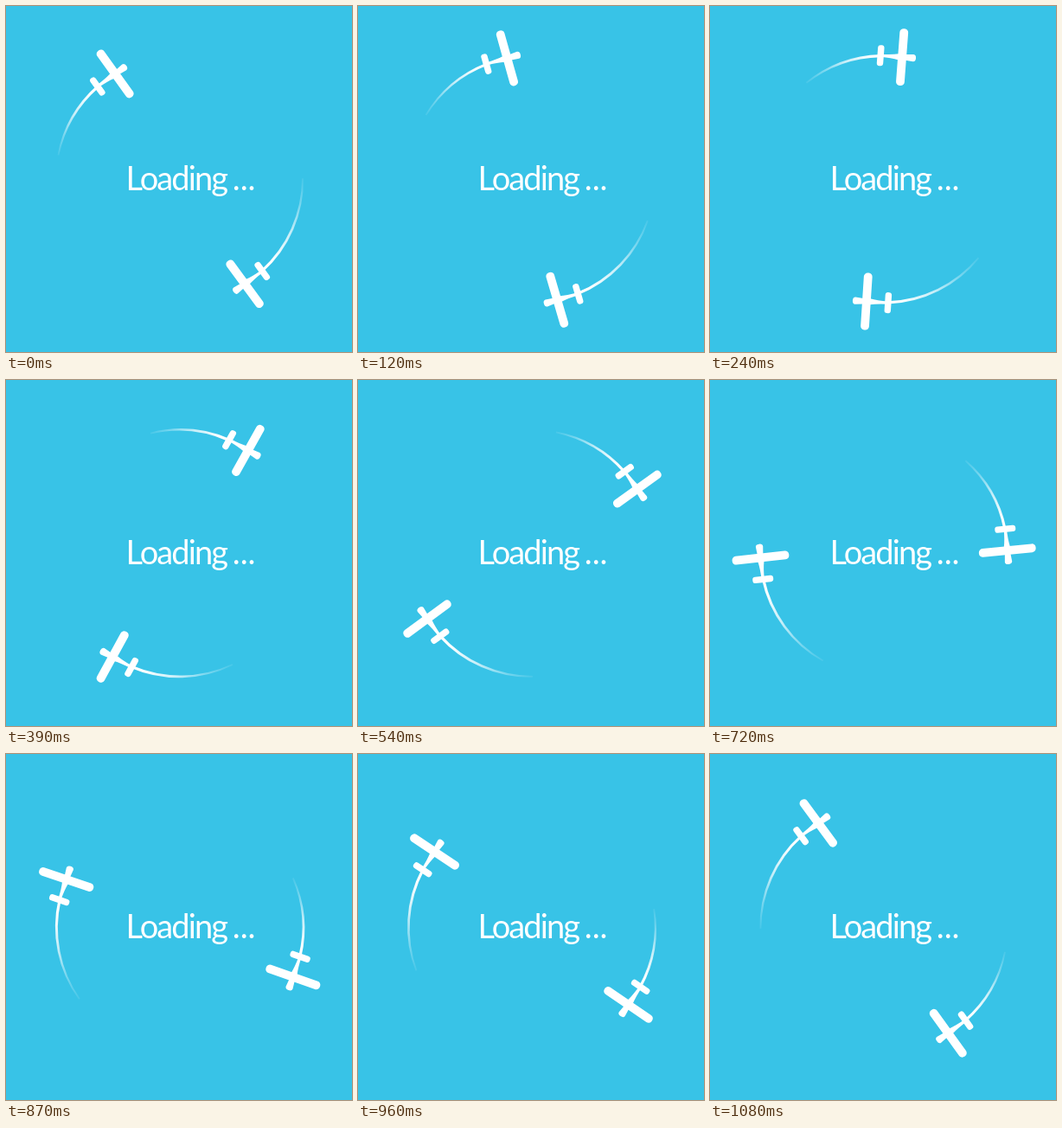
Recreate the animation shown at these times as an HTML page. Size 400 px wide and 400 px high, loop 1110 ms.

```html
<!DOCTYPE html>
<html lang="en">
<head>
<meta charset="utf-8">
<title>Loading</title>
<style>
  html, body { margin: 0; width: 100%; height: 100%; overflow: hidden; background: #38c3e7; }
  svg { display: block; width: 100vw; height: 100vh; }
  text { font: 38px Lato, "Open Sans", sans-serif; fill: #fff; }
  .word { letter-spacing: -1.9px; }
</style>
</head>
<body>
<svg viewBox="0 0 400 400">
  <defs>
    <g id="plane" fill="#fff">
      <rect x="-4.9" y="-33" width="9.8" height="66" rx="4.4"/>
      <rect x="-28.7" y="-12" width="7.4" height="24" rx="3.2"/>
      <path d="M-25-1.6Q-12-1.8-4-3.6L4-3.3L13-4.2Q16-4 16 0Q16 4 13 4.2L4 3.3L-4 3.6Q-12 1.8-25 1.6Z"/>
    </g>
  </defs>
  <g id="orbit"></g>
  <text class="word" x="138.5" y="213.2">Loading</text>
  <text x="261.7" y="213.2">...</text>
</svg>
<script>
const STEP_MS = 30, STEPS = 37, STEP_DEG = 5;
const CENTER = { x: 200.7, y: 200.6 };
const TAIL_LAG = 10, TILT = -4.3;
const TRAIL_THIN = 0.9, TRAIL_THICK = 1.6;

// Angles are clockwise degrees from straight up.
const flyers = [
  { angle: -31.4, radius: 143.1, trail: 47.2 },
  { angle: 148, radius: 142.3, trail: 58.5 }
];
const fade = [[0, 0.08], [0.25, 0.32], [0.55, 0.72], [0.9, 1]];

function polar(deg, radius) {
  const a = deg * Math.PI / 180;
  return [radius * Math.sin(a), -radius * Math.cos(a)].map(v => v.toFixed(2));
}

// A crescent strip that widens from its far end towards the plane.
function trailPath(from, to, radius) {
  const arc = (sweep, end) => `A${radius} ${radius} 0 0 ${sweep} ${end}`;
  return `M${polar(from, radius + TRAIL_THIN)}${arc(1, polar(to, radius + TRAIL_THICK))}` +
    `L${polar(to, radius - TRAIL_THICK)}${arc(0, polar(from, radius - TRAIL_THIN))}Z`;
}

function flyerMarkup({ angle, radius, trail }, i) {
  const from = angle - trail, to = angle - TAIL_LAG;
  const [x1, y1] = polar(from, radius);
  const [x2, y2] = polar(to, radius);
  const stops = fade.map(([at, alpha]) =>
    `<stop offset="${at}" stop-color="#fff" stop-opacity="${alpha}"/>`).join("");
  return `
    <linearGradient id="fade${i}" gradientUnits="userSpaceOnUse"
      x1="${x1}" y1="${y1}" x2="${x2}" y2="${y2}">${stops}</linearGradient>
    <path d="${trailPath(from, to, radius)}" fill="url(#fade${i})"/>
    <use href="#plane" transform="rotate(${angle}) translate(0 ${-radius}) rotate(${TILT})"/>`;
}

const orbit = document.getElementById("orbit");
orbit.innerHTML = flyers.map(flyerMarkup).join("");

function draw(ms) {
  const step = Math.floor(ms / STEP_MS) % STEPS;
  orbit.setAttribute("transform",
    `translate(${CENTER.x} ${CENTER.y}) rotate(${step * STEP_DEG})`);
}

let start;
function tick(now) {
  start ??= now;
  draw(now - start);
  requestAnimationFrame(tick);
}
draw(0);
requestAnimationFrame(tick);
</script>
</body>
</html>
```
